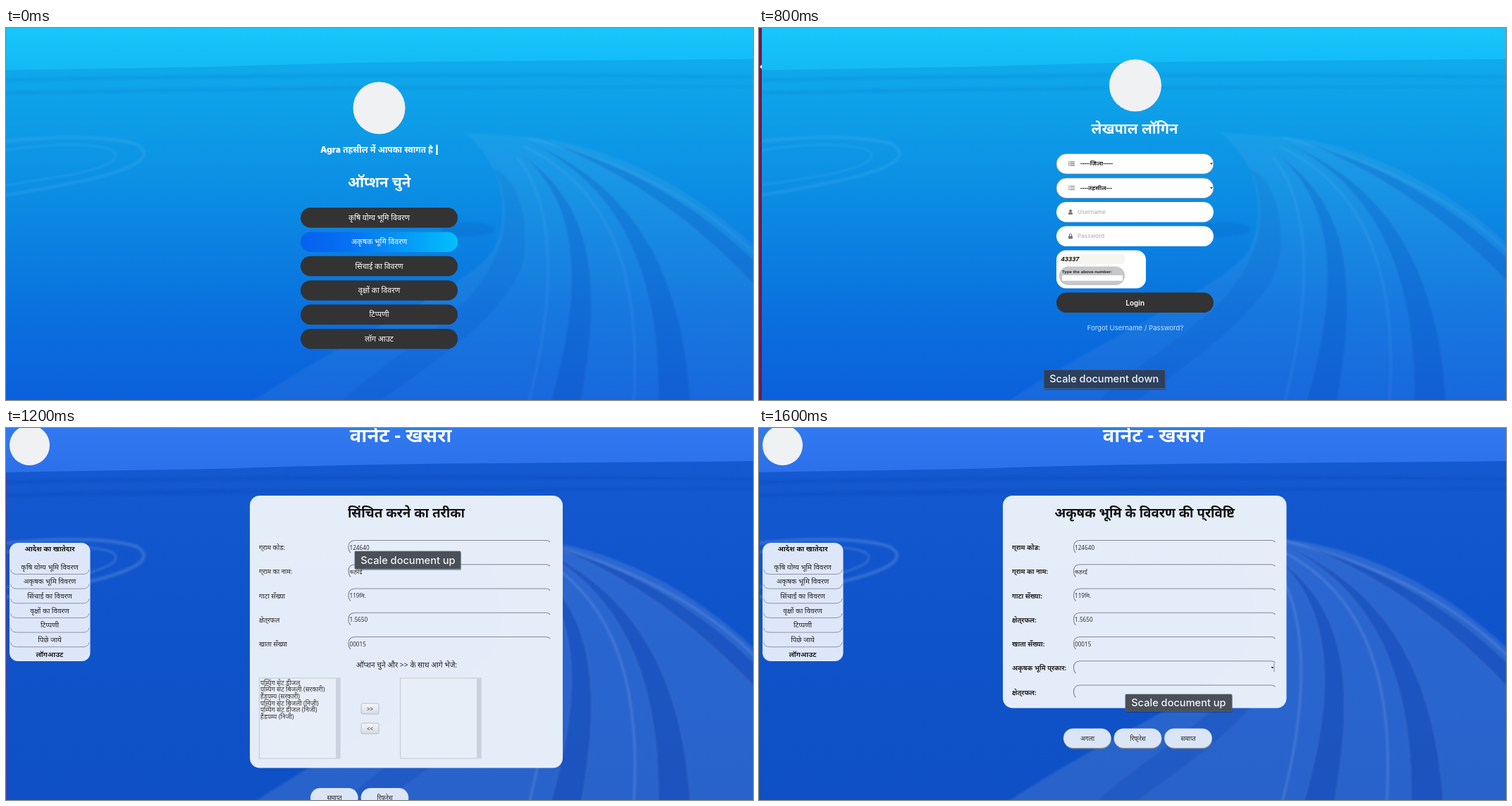
Write an HTML page that moves like this. It is 1060x528 px and loops after 1.8 s.

```html
<!DOCTYPE html>
<html lang="hi">
<head>
<meta charset="utf-8">
<title>खसरा</title>
<style>
html, body { margin: 0; width: 100%; height: 100%; overflow: hidden; background: #0b6bd9; }
svg { display: block; width: 1060px; height: 528px; }
text { font-family: 'Noto Sans', 'Noto Sans Devanagari', sans-serif; white-space: pre; }
.ui { font-family: Inter, 'Noto Sans Devanagari', sans-serif; }
.arial { font-family: 'Liberation Sans', Arial, sans-serif; }
.scene { visibility: hidden; animation: show 1800ms step-end infinite; }
.scene:first-of-type { visibility: visible; animation: none; }
/* a little overlap, the next scene covers it */
@keyframes show {
  0% { visibility: visible; }
  11.112%, 100% { visibility: hidden; }
}
</style>
</head>
<body>
<svg id="stage" viewBox="0 0 1060 528">
  <defs>
    <linearGradient id="cyan-sky" x2="0" y2="1">
      <stop offset="0" stop-color="#17c7fb"/><stop offset=".12" stop-color="#13b8f4"/>
    </linearGradient>
    <linearGradient id="cyan-land" x2="0" y2="1">
      <stop offset="0" stop-color="#0fabec"/><stop offset=".2" stop-color="#0d9be7"/>
      <stop offset=".48" stop-color="#0b85e2"/><stop offset=".74" stop-color="#0a6fde"/>
      <stop offset="1" stop-color="#0b5edb"/>
    </linearGradient>
    <linearGradient id="blue-sky" x2="0" y2="1">
      <stop offset="0" stop-color="#3079f1"/><stop offset=".12" stop-color="#2c70ea"/>
    </linearGradient>
    <linearGradient id="blue-land" x2="0" y2="1">
      <stop offset="0" stop-color="#1459cf"/><stop offset=".4" stop-color="#0f54cb"/>
      <stop offset="1" stop-color="#0e4fc4"/>
    </linearGradient>
    <linearGradient id="active">
      <stop offset="0" stop-color="#0560ef"/><stop offset=".3" stop-color="#0670f2"/>
      <stop offset="1" stop-color="#04bffb"/>
    </linearGradient>
    <linearGradient id="key" x2="0" y2="1">
      <stop offset="0" stop-color="#f6f7f9"/><stop offset="1" stop-color="#d5dae3"/>
    </linearGradient>
    <filter id="soft"><feGaussianBlur stdDeviation="1.6"/></filter>
    <path id="land" d="M-9 62 300 57Q500 50 700 49L1070 46V545H-9Z"/>
    <g id="tracks" filter="url(#soft)">
      <path fill="#fff" opacity=".11" d="M720 155C850 160 980 230 1070 320V545H330C480 440 640 380 690 320 720 260 700 190 650 150Z"/>
      <g fill="#003aa8" opacity=".36">
        <path d="M730 180C800 240 830 340 770 540H815C850 350 830 250 730 180Z"/>
        <path d="M735 160C860 220 930 330 925 540H972C960 330 880 220 735 160Z"/>
        <path d="M760 160C900 200 1000 270 1070 340V375C990 290 900 215 760 160Z"/>
        <path opacity=".5" d="M690 200C720 250 715 330 640 400 560 470 500 500 470 540H520C620 470 720 400 735 330 745 260 720 210 690 200Z"/>
        <ellipse cx="655" cy="288" rx="38" ry="10" opacity=".7"/>
        <path d="M0 74Q500 62 1060 70V73Q500 68 0 78ZM0 92Q400 82 1060 84V86Q500 88 0 97Z" opacity=".5"/>
      </g>
      <g fill="none" stroke="#fff" opacity=".14" stroke-width="5">
        <path d="M-5 163Q125 150 185 167 222 190 130 214 60 230-5 240"/>
        <path d="M-5 176Q105 160 150 175 175 192 95 210L-5 226" stroke-width="3"/>
        <path d="M740 158C880 190 990 250 1065 325M735 170C850 225 905 340 890 540M725 185C770 240 790 350 740 540" stroke-width="3"/>
      </g>
    </g>
  </defs>
</svg>
<script>
const DARK = '#333', INK = '#222';
const LAND = ['कृषि योग्य भूमि विवरण', 'अकृषक भूमि विवरण', 'सिंचाई का विवरण', 'वृक्षों का विवरण', 'टिप्पणी'];

const text = (x, y, str, size, fill = INK, more = '') =>
  `<text x="${x}" y="${y}" font-size="${size}" fill="${fill}" ${more}>${str}</text>`;
const mid = (x, y, str, size, fill, weight = 500, more = '') =>
  text(x, y, str, size, fill, `text-anchor="middle" font-weight="${weight}" ${more}`);
const box = (x, y, w, h, r, fill, more = '') =>
  `<rect x="${x}" y="${y}" width="${w}" height="${h}" rx="${r}" fill="${fill}" ${more}/>`;
const line = (d, stroke, width = 1) =>
  `<path d="${d}" fill="none" stroke="${stroke}" stroke-width="${width}"/>`;
const seal = (x, y, r) => `<circle cx="${x}" cy="${y}" r="${r}" fill="#f0f1f2"/>`;
const arrow = (x, y) => `<path d="M${x - 2} ${y - 1}h4l-2 2.5z" fill="#333"/>`;
// keep the halant visible before र
const open = s => s.replace(/्र/g, '्\u200cर');

const backdrop = (tone, dx, dy, strength) =>
  box(0, 0, 1060, 528, 0, `url(#${tone}-sky)`) +
  `<g transform="translate(${dx} ${dy})"><use href="#land" fill="url(#${tone}-land)"/>` +
  `<use href="#tracks" opacity="${strength}"/></g>`;

const tip = (x, y, w, h, str, fill = '#4a4f58') =>
  box(x + 1, y + 2, w, h, 1, '#00184a', 'opacity=".3"') +
  box(x, y, w, h, 1, fill, 'stroke="#5d6673" stroke-width=".8"') +
  text(x + 8.2, y + h / 2 + 5.2, str, 14.6, '#f2f4f6', 'class="ui" font-weight="500"');

// cyan pages
const pill = (x, y, fill = DARK, more = '') => box(x, y, 223, 28.5, 14.2, fill, more);
const darkPill = (y, str) => pill(422, y) + mid(533.5, y + 17.3, str, 9.2, '#ddd', 400);
const edge = y => box(0, 0, 4, 528, 0, '#7b1155') + `<path d="M4 ${y - 3}v6l-3-3z" fill="#fff"/>`;

function select(y, str) {
  const c = y + 14;
  let icon = '';
  for (let i = -1; i < 2; i++) icon += `M439 ${c + i * 2.5}h1.6m.8 0h6.6`;
  return pill(422, y, '#fff', 'stroke="#8b93a0" stroke-width=".8"') + line(icon, '#777', 1.2) +
    text(456, c + 2.6, str, 8.6, '#222', 'font-weight="700"') + arrow(642, c);
}

function input(y, str, icon) {
  return pill(422, y, '#fff') + `<path d="${icon}" transform="translate(442 ${y + 14.5})" fill="#777"/>` +
    text(452, y + 17, str, 8.1, '#bcbcbc', 'class="ui" font-weight="600"');
}

function menu() {
  let s = backdrop('cyan', 0, -2, .5) + seal(529.5, 113.5, 37);
  s += mid(530, 176.5, '<tspan class="ui" font-weight="900">Agra</tspan> तहसील में आपका स्वागत है <tspan class="ui" font-weight="900">|</tspan>', 12, '#fff', 600);
  s += mid(529.5, 226, 'ऑप्शन चुने', 20.2, '#fff', 600);
  [...LAND, 'लॉग आउट'].forEach((str, i) => {
    const y = 255 + i * 34.4;
    s += pill(418, y, i === 1 ? 'url(#active)' : DARK) + mid(529.5, y + 17.8, str, 10.7, '#fff');
  });
  return s;
}

function plot() {
  return backdrop('cyan', 4, 3, .5) + edge(61) + seal(534, 138.5, 37) +
    mid(533.5, 206, 'निम्नलिखित गाटा सँख्या भरे', 20, '#fff', 600) +
    ['----ग्राम नाम----', '----खाता सँख्या----', '----गाटा सँख्या----']
      .map((str, i) => select(235.3 + i * 34.4, str)).join('') +
    darkPill(344, 'अगला') + darkPill(378, 'दोबारा भरे');
}

function login() {
  const user = 'M0-4a2 2 0 0 1 0 4a2 2 0 0 1 0-4M-3.2 3.2Q-3 0-1.3 0H1.3Q3 0 3.2 3.2Z';
  const lock = 'M-3-.6h.9V-2a2.1 2.1 0 0 1 4.2 0V-.6H3V3.5H-3ZM-1-.6h2V-2a1 1 0 0 0-2 0Z';
  return backdrop('cyan', 4, -2, .5) + edge(55) + seal(534, 81.5, 37) +
    mid(533, 149.5, 'लेखपाल लॉगिन', 20.2, '#fff', 600) +
    select(178.6, '-----जिला-----') + select(213, '----तहसील---') +
    input(247, 'Username', user) + input(281.3, 'Password', lock) +
    box(422, 315.5, 127, 54, 13.5, '#fff') + box(428, 321, 91, 14, 4, '#f6f5f0') +
    text(428.5, 331.2, '43337', 9.4, '#111', 'class="arial" font-weight="700" font-style="italic"') +
    box(426, 338.5, 93, 26.5, 13, '#c6c7c8') +
    text(430, 347.6, 'Type the above number:', 6.2, '#222', 'class="arial" font-weight="700"') +
    box(430, 351, 86, 7.8, 1, '#fff') +
    pill(422, 375.6) + mid(533.8, 393.5, 'Login', 9.8, '#eee', 700, 'class="ui"') +
    mid(534, 428.6, 'Forgot Username / Password?', 9.6, '#c9e2fa', 400, 'class="ui"') +
    tip(404, 485, 172.5, 26.5, 'Scale document down', '#2c405e');
}

// blue pages; dy is the scroll offset
function page(dy, panelW, panelH, title) {
  let s = backdrop('blue', 0, dy + 6, 1) + box(0, 64, 1, 464, 0, '#4b3da0');
  s += seal(33.5, 29.5 + dy, 28.5) + mid(560, 25 + dy, 'वानेट - खसरा', 27.4, '#fff', 600);
  s += box(5, 168 + dy, 114.5, 168, 12, '#e6eefb', 'opacity=".96"');
  s += mid(62, 179.5 + dy, 'आदेश का खातेदार', 9.9, '#111', 700);
  [...LAND, 'पिछे जाये', 'लॉगआउट'].forEach((str, i) => {
    const y = 202 + i * 20.65 + dy;
    s += mid(62, y + 3.8, str, 10, INK, i === 6 ? 700 : 500);
    if (i < 6) s += line(`M6.5 ${y + 4}q1 6.5 9 6.5H109q8 0 9-6.5`, '#8b95a5');
  });
  s += box(346, 101 + dy, panelW, panelH, 14, '#eaf0fa', 'opacity=".98"');
  return s + mid(346 + panelW / 2, 132 + dy, open(title), 18.7, '#111', 600);
}

const label = (y, str, weight) => text(359, y + 3.6, open(str), 9.4, INK, `font-weight="${weight}"`);

function field(x, y, value = '') {
  return line(`M${x + 3} ${y + 7.5}q-3-3-3-8.5 0-9 10-9H${x + 280}q4 0 6 2.5`, '#858a92', 1.2) +
    text(x + 1.5, y + 3.2, value, 8.2, '#333');
}

function rows(x, top, step, labels, weight = 600, skip = -1) {
  const values = ['124640', 'कहरई', '119मि.', '1.5650', '00015'];
  return labels.map((str, i) => {
    const y = top + i * step;
    return label(y, str, weight) + (i === skip ? '' : field(x, y, values[i]));
  }).join('');
}

const buttons = (y, names) => names.map((str, i) => {
  const x = 432 + i * 71.6;
  return box(x + .5, y + 1, 67.5, 28, 14, '#7d8796') + box(x, y, 67.5, 27.5, 13.7, '#dbe5f5') +
    mid(x + 34, y + 17.2, open(str), 8.8, INK, 500);
}).join('');

const BASE = ['ग्राम कोड:', 'ग्राम का नाम:'];

const remark = () => page(0, 381.5, 321.5, 'टिप्पणी') +
  rows(426, 175, 34.4, [...BASE, 'गाटा सँख्या', 'क्षेत्रफल', 'खाता सँख्या']) +
  label(373, 'टिप्पणी', 600) +
  box(425.5, 337, 282.5, 71.5, 0, '#e6ecf7', 'stroke="#c3c8d0"') +
  buttons(451.5, ['रिफ्रेश', 'समाप्त']) +
  tip(336, 272, 171, 24.5, 'Scale document down');

function irrigation() {
  const list = x => box(x, 355, 114.5, 114, 0, '#e8eef8', 'stroke="#c3c8d0"') +
    box(x + 108.5, 355.5, 6, 113, 0, '#cbd2de');
  const key = (y, str) => box(504, y, 25, 15, 2, 'url(#key)', 'stroke="#aab0ba" stroke-width=".8"') +
    mid(516.5, y + 10.5, str, 8, '#333', 500);
  const pumps = ['पम्पिंग सेट डीजल', 'पम्पिंग सेट बिजली (सरकारी)', 'हैंडपम्प (सरकारी)',
    'पम्पिंग सेट बिजली (निजी)', 'पम्पिंग सेट डीजल (निजी)', 'हैंडपम्प (निजी)'];
  return page(-5, 444, 386.5, 'सिंचित करने का तरीका') +
    rows(486, 169.5, 34.25, [...BASE, 'गाटा सँख्या', 'क्षेत्रफल', 'खाता सँख्या'], 500) +
    mid(568.5, 339.5, 'ऑप्शन चुने और &gt;&gt; के साथ आगे भेजे:', 10.4, INK, 500) +
    list(359.5) + list(559.5) +
    pumps.map((str, i) => text(361, 364.5 + i * 9.7, str, 9, '#333')).join('') +
    key(391, '&gt;&gt;') + key(419, '&lt;&lt;') +
    buttons(511, ['समाप्त', 'रिफ्रेश']) +
    tip(495, 175, 150, 25, 'Scale document up');
}

const PLOT = [...BASE, 'गाटा सँख्या:', 'क्षेत्रफल:', 'खाता सँख्या:'];
const NEXT = ['अगला', 'रिफ्रेश', 'समाप्त'];

const crops = () => page(-6, 397.5, 370, 'कृषि योग्य भूमि विवरण की प्रविष्टि') +
  rows(442, 169, 34.15, [...PLOT, 'फसल का नाम:', 'सिंचित क्षेत्रफल:', 'असिंचित क्षेत्रफल:', 'फसली वर्ष:'], 600, 5) +
  box(442.5, 331, 283.5, 17.5, 1, 'none', 'stroke="#8a8f97" stroke-dasharray="1 .6"') +
  line('M442 331H726M720.5 331V348', '#70757d') + arrow(723.5, 340) +
  text(445, 343, '---चयन करे---', 8.2, '#333') +
  text(445, 445.4, '---Select---', 8.2, '#333') + arrow(724, 442.5) +
  buttons(494, NEXT) + tip(557, 159, 151, 24.5, 'Scale document up');

const barren = () => page(-5, 402.5, 301.5, 'अकृषक भूमि के विवरण की प्रविष्टि') +
  rows(446.5, 169.5, 34.25, [...PLOT, 'अकृषक भूमि प्रकार:', 'क्षेत्रफल:']) +
  arrow(728.5, 340) + line('M731 334v12', '#858a92') +
  buttons(426.5, NEXT) + tip(520, 378, 151, 24, 'Scale document up');

// the first page stays below; each later one covers it for 200 ms
const scenes = [menu, plot, login, remark, irrigation, crops, barren];
const stage = document.getElementById('stage');
stage.insertAdjacentHTML('beforeend', scenes.map((draw, i) =>
  `<g class="scene" style="animation-delay:${400 + i * 200 - 1800}ms">${draw()}</g>`).join(''));
</script>
</body>
</html>
```
